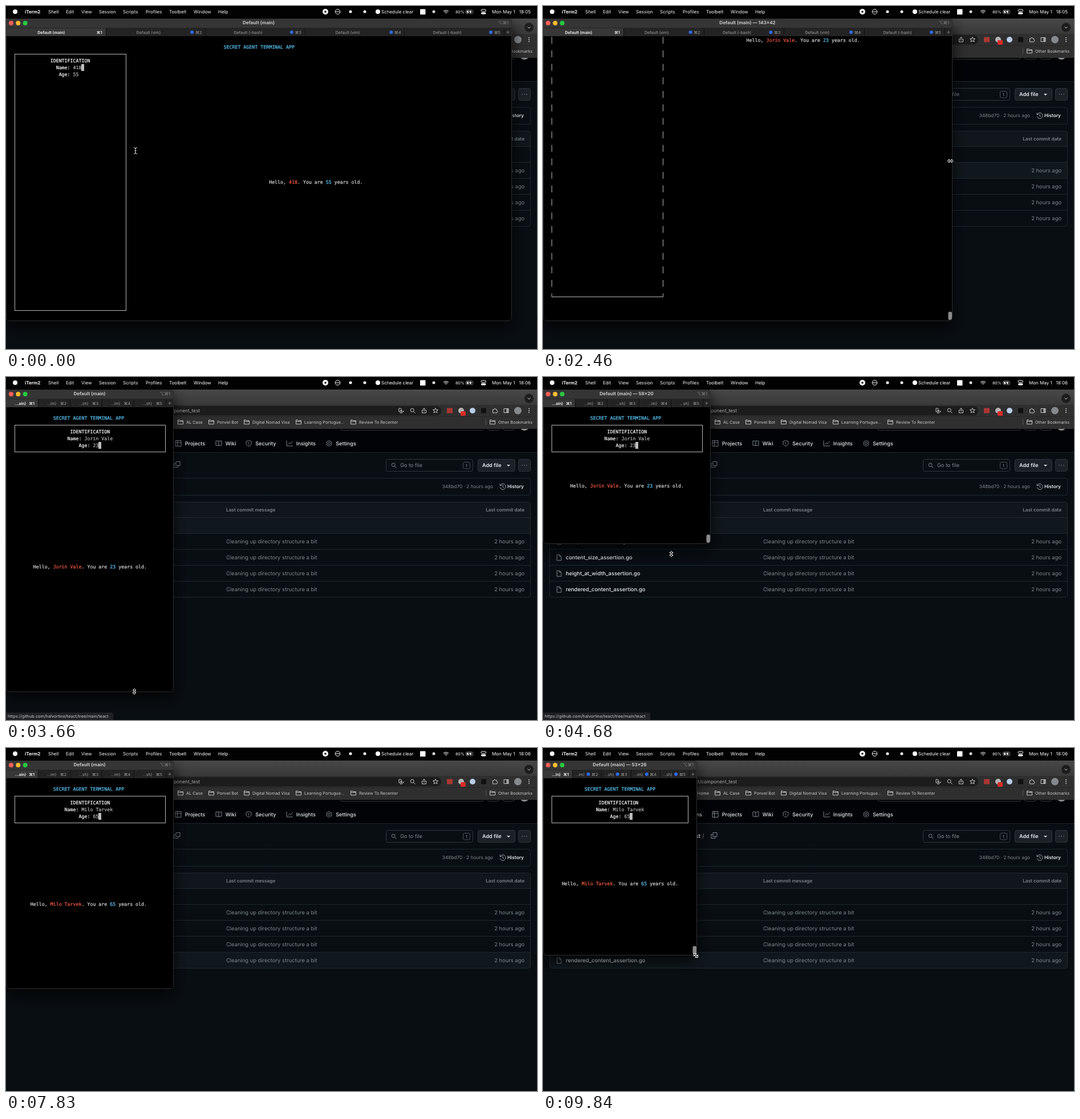
Write an HTML page with a canvas that moves like this. It is 931 px wide and 602 px high and loops after 9.87 s.

```html
<!DOCTYPE html>
<html lang="en">
<head>
<meta charset="utf-8">
<title>Terminal app demo</title>
<style>
  html, body { margin: 0; width: 100%; height: 100%; overflow: hidden; background: #000; }
  canvas { display: block; }
</style>
</head>
<body>
<canvas id="stage" width="931" height="602"></canvas>
<script>
const ctx = document.getElementById('stage').getContext('2d');
const LOOP = 9870, TAU = Math.PI * 2;
const SANS = 'Inter, "Liberation Sans", "DejaVu Sans", sans-serif';
const MONO = '"DejaVu Sans Mono", "Liberation Mono", monospace';
const CELL_W = 4.98, CELL_H = 11.85, PAD_W = 5.6, PAD_H = 54.6;
const CYAN = '#5cc8fa', RED = '#ff5c45', GREY = '#b8b8b8', LIGHT = '#dedede', WHITE = '#fff';
const FIRST = 'Jorin Vale', SECOND = 'Milo Tarvek';

// Window size over time: [ms, width, height]
const SIZES = [
  [0, 887, 552], [2200, 887, 552], [2850, 464, 552], [3200, 295, 552],
  [3700, 295, 552], [4540, 295, 222], [4680, 295, 292], [4940, 295, 422],
  [8000, 295, 422], [8450, 400, 532], [8880, 509, 505], [9080, 556, 480],
  [9500, 380, 400], [9840, 270, 363], [LOOP, 270, 363]
];

const clamp = (v, lo, hi) => Math.min(hi, Math.max(lo, v));
const mix = (a, b, p) => a + (b - a) * p;
const between = (t, a, b) => t >= a && t < b;
const progress = (t, a, b) => {
  const p = clamp((t - a) / (b - a), 0, 1);
  return p * p * (3 - 2 * p);
};

function sizeAt(t) {
  t = clamp(t, 0, LOOP - 1);
  const i = SIZES.findIndex(k => k[0] > t);
  const a = SIZES[i - 1], b = SIZES[i], p = (t - a[0]) / (b[0] - a[0]);
  return { w: mix(a[1], b[1], p), h: mix(a[2], b[2], p) };
}

function gridAt(t) {
  const { w, h } = sizeAt(t);
  return { cols: Math.round((w - PAD_W) / CELL_W), rows: Math.round((h - PAD_H) / CELL_H) };
}

// Backspaces over one value, then types the next
function retype(t, from, to, eraseAt, eraseStep, typeAt, typeStep) {
  if (t >= typeAt) return to.slice(0, Math.floor((t - typeAt) / typeStep) + 1);
  const erased = Math.max(0, Math.floor((t - eraseAt) / eraseStep) + 1);
  return from.slice(0, Math.max(0, from.length - erased));
}

function formAt(t) {
  const later = t >= 5300;
  return {
    name: later ? retype(t, FIRST, SECOND, 5700, 60, 6400, 80) : retype(t, '418', FIRST, 250, 80, 500, 65),
    age: later ? retype(t, '23', '65', 7430, 70, 7620, 120) : retype(t, '55', '23', 1290, 60, 1450, 80),
    onAge: between(t, 1200, 5350) || t >= 7350
  };
}

/* Drawing helpers */
function text(str, x, y, size = 8, color = WHITE, weight = 400, align = 'left') {
  ctx.font = `${weight} ${size}px ${SANS}`;
  ctx.textAlign = align;
  ctx.fillStyle = color;
  ctx.fillText(str, x, y + size * 0.36);
}
function rect(x, y, w, h, color) {
  ctx.fillStyle = color;
  ctx.fillRect(x, y, w, h);
}
function round(x, y, w, h, r, fill, stroke) {
  ctx.beginPath();
  ctx.roundRect(x, y, w, h, r);
  paint(fill, stroke);
}
function circle(x, y, r, fill, stroke) {
  ctx.beginPath();
  ctx.arc(x, y, r, 0, TAU);
  paint(fill, stroke);
}
function paint(fill, stroke) {
  if (fill) { ctx.fillStyle = fill; ctx.fill(); }
  if (stroke) { ctx.strokeStyle = stroke; ctx.stroke(); }
}
function line(color, ...pts) {
  ctx.beginPath();
  for (let i = 0; i < pts.length; i += 2) ctx.lineTo(pts[i], pts[i + 1]);
  paint(null, color);
}
function icon(path, x, y, color) {
  ctx.save();
  ctx.translate(x, y);
  ctx.strokeStyle = color;
  ctx.stroke(new Path2D(path));
  ctx.restore();
}

const ICONS = {
  folder: 'M-4.5 -3.5h3l1 1.2h5v6h-9zM-4.5 -1h9',
  file: 'M-3.5 -5h4.5l3 3v7h-7.5zM1 -5v3h3',
  install: 'M0 -4v5M-2 -1l2 2l2 -2M-1 -4h-3v6h8v-2M-2 4h4',
  search: 'M2.2 -.8a3 3 0 1 1 -6 0a3 3 0 1 1 6 0M1.5 1.5l3 3',
  share: 'M-1.5 -1h-2v5h7v-5h-2M0 2v-6M-2 -2.5l2 -2l2 2',
  star: 'M0 -4.5l1.3 3h3.2l-2.5 2.1l1 3.4l-3 -2l-3 2l1 -3.4l-2.5 -2.1h3.2z',
  puzzle: 'M-3.5 -2h2a1.5 1.5 0 1 1 3 0h2v2a1.5 1.5 0 1 1 0 3v1h-7z',
  panel: 'M-4 -3.5h8v7h-8zM1 -3.5v7M2 -3v6M3 -3v6',
  projects: 'M-5 -5h10v10h-10zM-5 -1.5h10M-1.5 -5v10',
  wiki: 'M0 -3.5c-1 -1 -3 -1 -5 -1v8c2 0 4 0 5 1c1 -1 3 -1 5 -1v-8c-2 0 -4 0 -5 1v8',
  shield: 'M0 -5l4.5 1.7v3c0 2.5 -2 4.5 -4.5 5.3c-2.5 -.8 -4.5 -2.8 -4.5 -5.3v-3zM0 -2v3M0 2v1',
  graph: 'M-5 -5v9.5h11M-3 2l3 -3l2 1.5l4 -4.5',
  gear: 'M0 -5l4.3 2.5v5l-4.3 2.5l-4.3 -2.5v-5zM2 0a2 2 0 1 1 -4 0a2 2 0 1 1 4 0',
  copy: 'M-2 -5h7v7h-7zM-3 -2h-2v7h7v-2',
  history: 'M-4.5 -2a5 5 0 1 1 -.3 3M-5 -5v3h3M0 -3v3.5l2 1',
  plus: 'M-2.5 0h5M0 -2.5v5',
  beam: 'M-3 -5.5q3 0 3 2q0 -2 3 -2M0 -4v8M-3 5.5q3 0 3 -2q0 2 3 2M-1.5 0h3'
};

function menuBar(t) {
  rect(0, 0, 931, 21, '#020202');
  circle(16, 10, 4, WHITE);
  text('iTerm2', 33, 10, 8, WHITE, 700);
  [['Shell', 74], ['Edit', 105], ['View', 132], ['Session', 163], ['Scripts', 205],
   ['Profiles', 245], ['Toolbelt', 286], ['Window', 329], ['Help', 372],
   ['Schedule clear', 658], ['Mon May 1', 852]].forEach(([s, x]) => text(s, x, 10));
  text(t < 3600 ? '18:05' : '18:06', 920, 10, 8, WHITE, 400, 'right');
  circle(560, 10, 5, WHITE);
  rect(558.5, 8.5, 3, 3, '#000');
  circle(581.5, 10, 4.3, null, WHITE);
  line(WHITE, 578, 10, 585, 10);
  circle(604, 10, 2.5, WHITE);
  circle(629, 10, 2.5, WHITE);
  circle(652, 10, 4, WHITE);
  round(726, 5.5, 9.5, 9.5, 1, WHITE);
  circle(750, 10, 2.5, '#ddd');
  for (const r of [2, 4.3, 6.5]) {
    ctx.beginPath();
    ctx.arc(771.5, 14, r, -2.35, -0.8);
    paint(null, WHITE);
  }
  text('80%', 788, 10, 7);
  round(806.5, 7, 12, 6.5, 2, null, '#888');
  rect(808, 8.5, 8, 3.5, WHITE);
  line('#000', 812.5, 7, 811, 10.5, 813, 10.5, 811.5, 14);
  round(833, 6, 8.5, 3.5, 1.7, null, WHITE);
  round(833, 11, 8.5, 3.5, 1.7, WHITE);
}

function browser(t) {
  const strip = ctx.createLinearGradient(0, 22, 0, 49);
  strip.addColorStop(0, '#484848');
  strip.addColorStop(1, '#393939');
  rect(0, 22, 931, 27, strip);
  rect(0, 49, 931, 42, '#2f2f30');
  round(70, 51, 693, 16.5, 8, '#1c1c1d');
  rect(0, 69, 931, 1, '#262627');
  circle(917, 37.5, 8, '#1d1d1e');
  line('#ccc', 914.5, 36.5, 917, 39, 919.5, 36.5);

  const pale = '#c8c8c8';
  text('github.com/halvortine/teact/tree/main/teact/component_test', 340, 59, 8.3, '#a8a8a8', 400, 'right');
  [['install', 693], ['search', 713], ['share', 733], ['star', 753], ['puzzle', 857], ['panel', 877]]
    .forEach(([n, x]) => icon(ICONS[n], x, 59, pale));
  rect(773, 54.5, 10, 9, '#a93732');
  circle(798, 59, 5, '#b4b4b4');
  round(797, 60, 9, 8, 1.5, '#d92d28');
  circle(818, 59, 5, '#b8cce6');
  rect(833, 54.5, 9, 9, '#111');
  circle(897.5, 59, 6.5, '#85898d');
  for (const dy of [-3.2, 0, 3.2]) circle(917, 59 + dy, 1, pale);

  text('Home', 291, 79, 7.3, pale, 400, 'right');
  [['AL Case', 306], ['Ponvel Bot', 360], ['Digital Nomad Visa', 422], ['Learning Portugue...', 513],
   ['Review To Recenter', 609], ['Other Bookmarks', 853]].forEach(([s, x]) => {
    icon(ICONS.folder, x, 79, pale);
    text(s, x + 10, 79, 7.3, pale);
  });
  line('#555', 841.5, 74, 841.5, 84);
  page(t);
}

function page(t) {
  const edge = '#1e2931', dim = '#7d868d', bright = '#e6eaee', body = '#090e13';
  ctx.save();
  ctx.beginPath();
  ctx.rect(0, 91, 931, 511);
  ctx.clip();
  rect(0, 91, 931, 511, body);
  rect(0, 91, 931, 41, '#010306');
  rect(0, 132, 931, 1, edge);
  round(586, 74, 252, 19.5, 4, null, '#30363d');
  round(844, 74, 21, 19.5, 4, null, '#30363d');
  round(871, 74, 21, 19.5, 4, null, '#30363d');
  circle(909, 86, 8, '#8b8e91');

  text('Actions', 279, 117, 9.1, bright, 500, 'right');
  [['projects', 'Projects', 302], ['wiki', 'Wiki', 373], ['shield', 'Security', 425.5],
   ['graph', 'Insights', 497], ['gear', 'Settings', 566.5]].forEach(([n, s, x]) => {
    icon(ICONS[n], x, 116.5, dim);
    text(s, x + 11.7, 117, 9.1, bright, 500);
  });
  text('component_test', 276, 154, 10, bright, 600, 'right');
  text('/', 279, 154, 10, dim);
  icon(ICONS.copy, 300, 153.5, dim);

  round(666.5, 144.5, 152, 21, 3, body, '#30363d');
  icon(ICONS.search, 680, 155, dim);
  text('Go to file', 691, 155, 9.2, dim);
  round(801.5, 149.5, 12, 11.5, 2.5, null, '#4a5159');
  text('t', 807.5, 155, 8, dim, 400, 'center');
  round(827.5, 144.5, 65, 21, 3, '#1c2128', '#30363d');
  text('Add file', 835, 155, 9, bright, 600);
  ctx.beginPath();
  ctx.moveTo(878, 154); ctx.lineTo(884, 154); ctx.lineTo(881, 157);
  paint(bright);
  round(898.5, 144.5, 21, 21, 3, '#1c2128', '#30363d');
  for (const x of [905, 909, 913]) circle(x, 155, 0.8, dim);

  round(11.5, 177.5, 908, 30, 4, null, edge);
  text('348bd70 · 2 hours ago', 854, 192.5, 8.3, dim, 400, 'right');
  icon(ICONS.history, 871, 192.5, '#9aa2aa');
  text('History', 908, 192.5, 8.3, bright, 600, 'right');

  round(11.5, 219.5, 908, 28, [4, 4, 0, 0], '#10161b');
  text('Last commit message', 386, 233, 8.2, dim, 600);
  text('Last commit date', 909, 233, 8.2, dim, 600, 'right');
  const hovered = t < 2300 ? -1 : t < 3300 ? 1 : t < 4850 ? 0 : 4;
  ['..', 'component_assertion.go', 'content_size_assertion.go', 'height_at_width_assertion.go',
   'rendered_content_assertion.go'].forEach((name, i) => {
    const top = 246 + 28 * i;
    if (i === hovered) rect(12, top, 908, 28, '#11181d');
    rect(12, top, 908, 1, edge);
    text(name, 40, top + 15, 9.4, bright, 500);
    if (!i) return;
    icon(ICONS.file, 28, top + 15, dim);
    text('Cleaning up directory structure a bit', 386, top + 15, 9.4, dim);
    text('2 hours ago', 909, top + 15, 9.4, dim, 400, 'right');
  });
  round(11.5, 219.5, 908, 167, 4, null, edge);

  if (between(t, 3300, 5100)) {
    round(0, 589, 188, 14, [0, 3, 0, 0], '#202124');
    text('https://github.com/halvortine/teact/tree/main/teact', 3, 595.5, 7.35, '#c4c7ca');
  }
  ctx.restore();
}

function shorten(label, room, weight) {
  ctx.font = `${weight} 7px ${SANS}`;
  if (ctx.measureText(label).width <= room) return label;
  while (label.length > 3 && ctx.measureText('...' + label).width > room) label = label.slice(1);
  return '...' + label;
}

function tabs(t, w) {
  const tabW = (w - 14) / 5, dots = !between(t, 3300, 7950);
  rect(1, 39, w - 1, 14, '#232323');
  rect(1, 39, tabW, 14, '#373737');
  ['main', 'vim', '-bash', 'vim', '-bash'].forEach((job, i) => {
    const end = tabW * (i + 1), active = i === 0;
    const color = active ? WHITE : '#a4a4a4', weight = active ? 600 : 400;
    const shift = active ? (tabW > 80 ? 8 : 2.5) : dots ? 12 : 4;
    const label = shorten(`Default (${job})`, tabW * 0.72 - 20, weight);
    text(label, end - tabW / 2 - shift, 46, 7, color, weight, 'center');
    text('⌘' + (i + 1), end - 6, 46, 7, color, weight, 'right');
    if (dots && !active) circle(end - 23, 46, 3, '#3168ea');
    rect(Math.round(end), 39, 1, 14, '#101010');
  });
  icon(ICONS.plus, w - 7, 46, '#777');
}

const colX = c => 3 + CELL_W * c;
const rowY = r => 60.3 + CELL_H * r;
const crisp = v => Math.round(v) + 0.5;

// The hairline stroke thickens the glyphs slightly
function cells(col, row, str, color) {
  ctx.font = `8.3px ${MONO}`;
  ctx.textAlign = 'left';
  ctx.fillStyle = ctx.strokeStyle = color;
  ctx.lineWidth = 0.2;
  [...str].forEach((ch, i) => {
    const x = colX(col + i), y = rowY(row) + 3;
    ctx.fillText(ch, x, y);
    ctx.strokeText(ch, x, y);
  });
  ctx.lineWidth = 1;
}

function greeting(form) {
  return [['Hello, ', LIGHT], [form.name, RED], ['. You are ', LIGHT], [form.age, CYAN], [' years old.', LIGHT]];
}

function hello(parts, col, row) {
  for (const [str, color] of parts) {
    cells(col, row, str, color);
    col += str.length;
  }
}

function field(label, value, focused, row, inner) {
  const col = 3 + Math.ceil((inner - label.length - value.length - 1) / 2);
  cells(col, row, label, WHITE);
  cells(col + label.length, row, value, GREY);
  if (focused) rect(Math.round(colX(col + label.length + value.length)), Math.round(rowY(row) - 6), 5, 12, '#bdbdbd');
}

function terminal(t, grid) {
  // Redrawn content trails the window while it grows
  const past = gridAt(t - 40);
  const cols = Math.min(grid.cols, past.cols), rows = Math.min(grid.rows, past.rows);
  const form = formAt(t), wide = cols >= 80;
  const parts = greeting(form);
  const length = parts.reduce((sum, [str]) => sum + str.length, 0);
  const left = crisp(colX(2.5)), right = crisp(colX(wide ? 41.5 : cols - 2.5));
  const helloCol = wide ? 42 + Math.floor((cols - 44 - length) / 2) : Math.floor((cols - length) / 2);

  // Wrapped lines scroll the layout while the wide window is squeezed
  if (wide && between(t, 2200, 3200) && Math.floor(t / 90) % 2) {
    for (let r = 0; r < rows - 5; r += 2)
      for (const x of [left, right]) line(GREY, x, rowY(r) - 6, x, rowY(r) + 6);
    const y = crisp(rowY(rows - 4) - 0.5);
    line(GREY, left, y - 6, left, y, right, y, right, y - 6);
    hello(parts, helloCol, 0);
    return;
  }
  cells(Math.floor((cols - 25) / 2), 1, 'SECRET AGENT TERMINAL APP', CYAN);
  const top = crisp(rowY(2)), bottom = crisp(rowY(wide ? rows - 2 : 6));
  ctx.strokeStyle = GREY;
  ctx.strokeRect(left, top, right - left, bottom - top);
  const inner = wide ? 38 : cols - 6;
  cells(3 + Math.floor((inner - 14) / 2), 3, 'IDENTIFICATION', WHITE);
  field('Name: ', form.name, !form.onAge, 4, inner);
  field('Age: ', form.age, form.onAge, 5, inner);
  hello(parts, helloCol, wide ? Math.floor(rows / 2) : Math.ceil(rows / 2) + 2);
}

function terminalWindow(t) {
  const grid = gridAt(t);
  const w = Math.round(PAD_W + CELL_W * grid.cols), h = Math.round(PAD_H + CELL_H * grid.rows);
  const resizing = between(t, 2200, 3200) || between(t, 3700, 5000) || t >= 8000;
  ctx.save();
  ctx.shadowColor = 'rgba(0,0,0,.8)';
  ctx.shadowBlur = 26;
  ctx.shadowOffsetY = 10;
  round(0, 22, w, h - 21, 6, '#000');
  ctx.restore();

  ctx.save();
  ctx.beginPath();
  ctx.roundRect(0, 22, w, h - 21, 6);
  ctx.clip();
  rect(0, 22, w, 17, '#353535');
  rect(0, 38, w, 1, '#262626');
  ['#ff5f57', '#febc2e', '#28c840'].forEach((c, i) => circle(9 + 12.3 * i, 30, 4, c));
  const size = resizing ? ` — ${grid.cols}×${grid.rows}` : '';
  text('Default (main)' + size, w / 2 - 0.5, 29.5, 8.1, '#c9c9c9', 700, 'center');
  text('⌥⌘1', w - 6, 29.5, 7.5, '#8c8c8c', 400, 'right');
  tabs(t, w);
  terminal(t, grid);
  if (resizing) round(w - 7.5, h - 15.5, 6.5, 14.5, 3, '#8a8a8a');
  ctx.restore();
  round(0.5, 22.5, w - 1, h - 22, 6, null, '#2e2e2e');
}

function doubleArrow(x, y, angle) {
  ctx.save();
  ctx.translate(x, y);
  ctx.rotate(angle);
  const shape = new Path2D('M-5 0l3 -3v2h4v-2l3 3l-3 3v-2h-4v2z');
  ctx.fillStyle = '#000';
  ctx.strokeStyle = WHITE;
  ctx.fill(shape);
  ctx.stroke(shape);
  ctx.restore();
}

function pointer(t) {
  const { w, h } = sizeAt(t);
  if (t < 250 || between(t, 1650, 2200)) {
    const p = progress(t, 1650, 2150);
    icon(ICONS.beam, mix(227, 884, p), mix(254, 272, p), '#ddd');
  } else if (between(t, 2200, 3200)) {
    doubleArrow(w - 3, 272, 0);
  } else if (between(t, 3200, 3700)) {
    const p = progress(t, 3250, 3650);
    doubleArrow(mix(296, 225, p), mix(272, 552, p), p < 0.5 ? 0 : Math.PI / 2);
  } else if (between(t, 3700, 5650)) {
    doubleArrow(225, sizeAt(t + 36).h, Math.PI / 2);
  } else if (between(t, 7850, 8000)) {
    const p = progress(t, 7850, 7980);
    doubleArrow(mix(225, 294, p), 423, p < 0.8 ? Math.PI / 2 : Math.PI / 4);
  } else if (t >= 8000) {
    doubleArrow(w - 2, h + 1, Math.PI / 4);
  }
}

function frame(now) {
  const t = now % LOOP;
  ctx.lineWidth = 1;
  ctx.textRendering = 'geometricPrecision';
  rect(0, 0, 931, 602, '#000');
  browser(t);
  menuBar(t);
  terminalWindow(t);
  pointer(t);
  requestAnimationFrame(frame);
}
requestAnimationFrame(frame);
</script>
</body>
</html>
```
